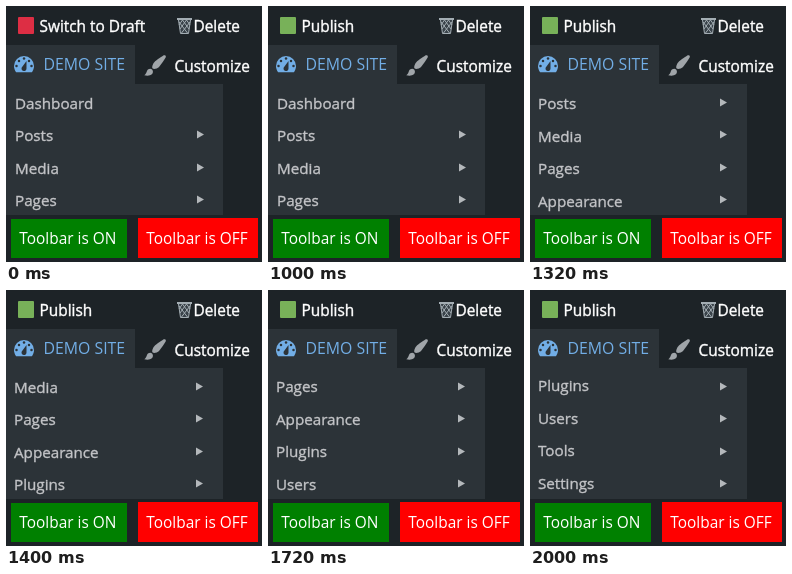
These frames come from a looping animation (256 by 256 pixels, 2.2 s). An HTML page:

```html
<!DOCTYPE html>
<html lang="en">
<head>
<meta charset="utf-8">
<title>Admin toolbar</title>
<style>
  html, body { margin: 0; width: 100%; height: 100%; overflow: hidden; background: #1d2327; }
  svg { display: block; width: 256px; height: 256px; }
  text { font: 15.4px "Open Sans", "Noto Sans", sans-serif; fill: #fff; white-space: pre; }
  .bar { stroke: #fff; stroke-width: .4; }
  #menu text { font-size: 15.2px; fill: #c3c4c7; stroke: #c3c4c7; stroke-width: .35; }
</style>
</head>
<body>
<svg viewBox="0 0 256 256">
  <path d="M0 39H129V78H217V209H0Z" fill="#2c3338"/>

  <rect id="state" x="12" y="11" width="16" height="17" rx="1"/>
  <text id="action" class="bar" x="33.5" y="26"></text>

  <!-- wastebasket -->
  <g fill="none" stroke="#a3adb3">
    <path d="M172.500 14L174.500 27.500H182.500L184.500 14" fill="#394249"/>
    <path d="M173 16L181.500 27M176.500 14L183 23M180.500 14L184 19M184 16L175.500 27M180.500 14L174 23M176.500 14L173 19"/>
    <path d="M171 13H186" stroke-width="2"/>
  </g>
  <text class="bar" x="187.5" y="26">Delete</text>

  <!-- gauge -->
  <g transform="translate(5.5 46.3) scale(1.25)" fill="#2c3338">
    <path d="M3.76 16H16.24C17.34 14.63 18 12.89 18 11A8 8 0 0 0 2 11C2 12.89 2.66 14.63 3.76 16Z" fill="#72aee6"/>
    <circle cx="10" cy="5" r="1"/>
    <circle cx="6" cy="7" r="1"/>
    <circle cx="14" cy="7" r="1"/>
    <circle cx="4" cy="11" r="1"/>
    <circle cx="16" cy="11" r="1"/>
    <path d="M8.63 11.55L12 7V13A2 2 0 1 1 8.630 11.550Z"/>
  </g>
  <text x="37.5" y="64" style="font-size:15.8px;fill:#72aee6">DEMO SITE</text>

  <!-- brush -->
  <path transform="translate(136.5 46.8) scale(1.27)" fill="#a0a5a9"
        d="M18.330 3.570s.27-.8-.31-1.360c-.53-.52-1.220-.24-1.220-.24-.61.3-5.760 3.470-7.670 5.570-.86.96-2.060 3.790-1.090 4.820.92.98 3.960-.17 4.790-1 2.060-2.060 5.210-7.170 5.500-7.790zM1.400 17.650c2.370-1.560 1.460-3.410 3.230-4.640.93-.65 2.220-.62 3.080.29.63.67.8 2.570-.16 3.460-1.570 1.450-4 1.550-6.150.89z"/>
  <text class="bar" x="168.5" y="66">Customize</text>

  <g id="menu"></g>

  <rect x="5" y="213" width="116" height="39" fill="#008000"/>
  <text x="13.3" y="238">Toolbar is ON</text>
  <rect x="132" y="212" width="120" height="40" fill="#f00"/>
  <text x="140.3" y="238">Toolbar is OFF</text>
</svg>
<script>
const LOOP = 2200, STEP = 200, ROWS = 4, PITCH = 32.5;
const items = ["Dashboard", "Posts", "Media", "Pages", "Appearance",
               "Plugins", "Users", "Tools", "Settings"];
const $ = id => document.getElementById(id);

function add(tag, attrs) {
  const el = document.createElementNS("http://www.w3.org/2000/svg", tag);
  for (const k in attrs) el.setAttribute(k, attrs[k]);
  return $("menu").appendChild(el);
}

const rows = Array.from({ length: ROWS }, (_, i) => ({
  label: add("text", {}),
  arrow: add("path", { d: `M191 ${Math.floor(97 + PITCH * i) - 4.5}v8l7-4z`, fill: "#b4b8bb" })
}));

function draw(now) {
  const t = now % LOOP;
  const published = t >= 1000;
  const top = Math.max(0, Math.floor((t - 1000) / STEP));
  // Each scroll step is slightly longer than a row, so the list drifts up.
  const first = top ? 104 - top / 2 : 103;

  $("state").setAttribute("fill", published ? "#78b159" : "#dd2e44");
  $("action").textContent = published ? "Publish" : "Switch to Draft";
  $("menu").setAttribute("transform", `translate(${top ? -1 : 0} 0)`);
  rows.forEach(({ label, arrow }, i) => {
    label.textContent = items[top + i];
    label.setAttribute("x", 9);
    label.setAttribute("y", Math.floor(first + PITCH * i));
    arrow.style.display = top + i ? "" : "none";
  });
  requestAnimationFrame(() => draw(performance.now() - start));
}

const start = performance.now();
draw(0);
</script>
</body>
</html>
```
